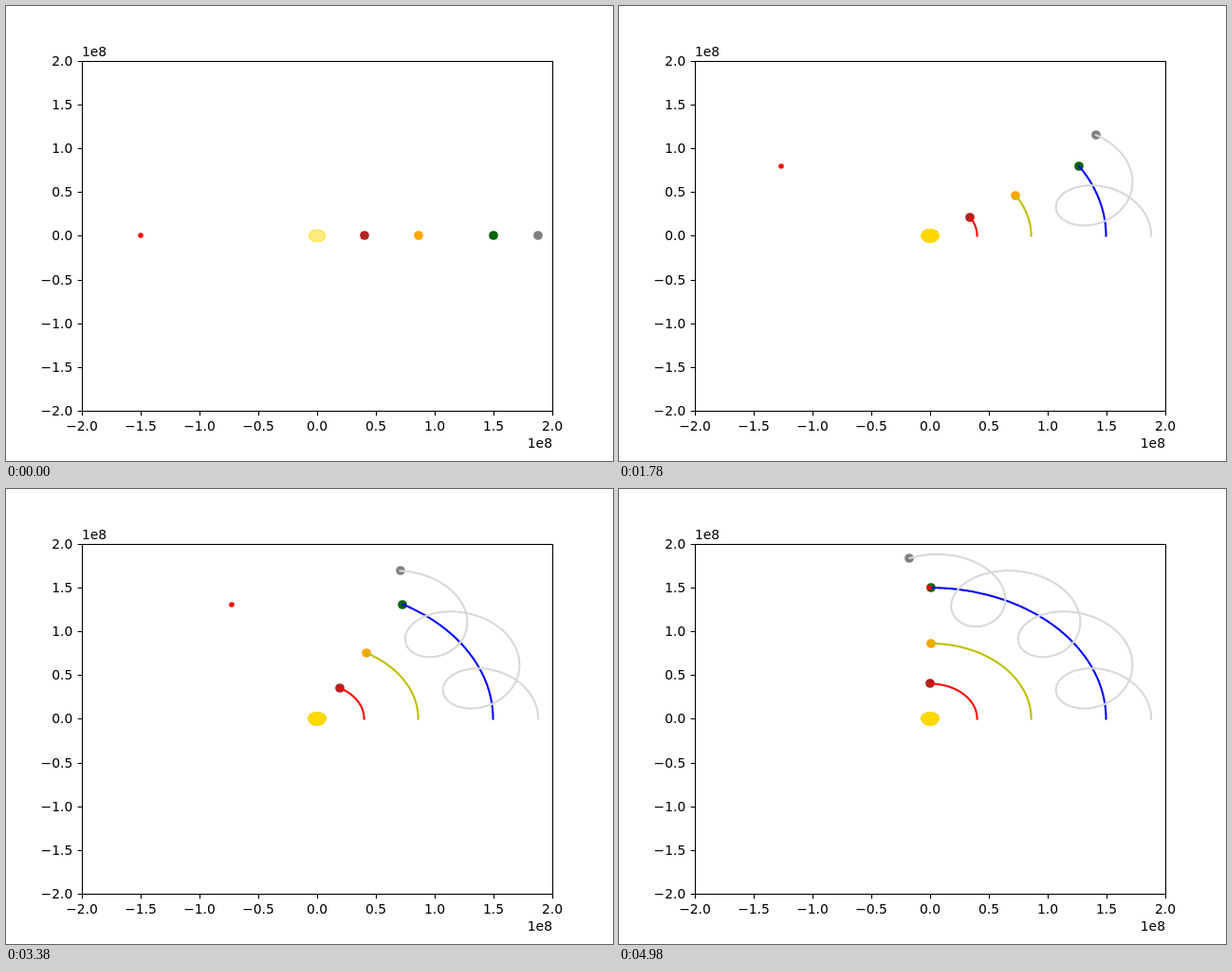
An HTML page that plays this animation: 640 by 480 pixels, repeating every 5000 ms.

```html
<!DOCTYPE html>
<html lang="en">
<head>
<meta charset="utf-8">
<title>Orbits</title>
<style>
  html, body { margin: 0; width: 100%; height: 100%; overflow: hidden; background: #fff; }
  svg { display: block; width: 640px; height: 480px; }
  text { font: 13.89px "DejaVu Sans", sans-serif; fill: #000; }
  .axis { stroke: #000; stroke-width: 1.11; fill: none; }
  .trail { fill: none; stroke-width: 2.08; stroke-linecap: square; stroke-linejoin: round; }
  .sun { fill: gold; fill-opacity: .5; stroke: gold; stroke-opacity: .5; stroke-width: 1.39; }
</style>
</head>
<body>
<svg id="stage" viewBox="0 0 640 480"></svg>
<script>
const STEPS = 250, STEP_MS = 20;
const MOON_RATE = 13.37; // moon turns per planet turn
const stage = document.getElementById('stage');

const px = x => 328 + 124 * x;      // data unit: 1e8
const py = y => 242.4 - 92.4 * y;
const snap = v => Math.floor(v + 0.5) + 0.5;
const angle = k => k / STEPS * Math.PI / 2;

function add(tag, attrs, text) {
  const el = document.createElementNS('http://www.w3.org/2000/svg', tag);
  for (const name in attrs) el.setAttribute(name, attrs[name]);
  if (text) el.textContent = text;
  return stage.appendChild(el);
}

const orbit = (r, phase = 0, dir = 1) => k => {
  const a = angle(k);
  return [dir * r * Math.cos(a), r * Math.sin(a)];
};
const earth = k => [1.496 * Math.cos(angle(k)), 1.496 * Math.sin(angle(k))];
const circle = r => k => [r * Math.cos(angle(k)), r * Math.sin(angle(k))];
const moon = k => {
  const [x, y] = earth(k), a = MOON_RATE * angle(k);
  return [x + 0.384 * Math.cos(a), y + 0.384 * Math.sin(a)];
};
const mirror = k => {
  const [x, y] = earth(k);
  return [-x, y];
};

const bodies = [
  { at: circle(0.4), color: 'firebrick', size: 4.86, trail: '#f00' },
  { at: circle(0.86), color: 'orange', size: 4.86, trail: '#bfbf00' },
  { at: earth, color: 'darkgreen', size: 4.86, trail: '#00f' },
  { at: moon, color: 'gray', size: 4.86, trail: '#d8d8d8' },
  { at: mirror, color: 'red', size: 2.78 }
];

// The translucent sun is painted once more on every step, so it builds up.
const suns = Array.from({ length: STEPS }, () =>
  add('ellipse', { class: 'sun', cx: px(0), cy: py(0), rx: 8.68, ry: 6.47 }));

for (const body of bodies) body.dot = add('circle', { r: body.size, fill: body.color });
for (const body of bodies) {
  if (!body.trail) continue;
  body.line = add('polyline', { class: 'trail', stroke: body.trail });
  body.points = Array.from({ length: STEPS }, (_, k) => {
    const [x, y] = body.at(k);
    return px(x).toFixed(2) + ',' + py(y).toFixed(2);
  });
}
stage.append(bodies[4].dot);

function drawAxes() {
  const left = snap(px(-2)), right = snap(px(2)), top = snap(py(2)), bottom = snap(py(-2));
  add('rect', { class: 'axis', x: left, y: top, width: right - left, height: bottom - top });
  for (let v = -2; v <= 2; v += 0.5) {
    const label = v.toFixed(1).replace('-', '\u2212');
    const x = snap(px(v)), y = snap(py(v));
    add('path', { class: 'axis', d: `M${x} ${bottom}v4.86M${left} ${y}h-4.86` });
    add('text', { x: px(v), y: 448, 'text-anchor': 'middle' }, label);
    add('text', { x: 70.3, y: Math.round(py(v) + 5), 'text-anchor': 'end' }, label);
  }
  add('text', { x: 80, y: 53 }, '1e8');
  add('text', { x: 576, y: 466, 'text-anchor': 'end' }, '1e8');
}

function render(ms) {
  const k = Math.floor(ms / STEP_MS + 0.001) % STEPS;
  suns.forEach((sun, i) => sun.setAttribute('display', i <= k ? 'inline' : 'none'));
  for (const { at, dot, line, points } of bodies) {
    const [x, y] = at(k);
    dot.setAttribute('cx', Math.round(px(x)));
    dot.setAttribute('cy', Math.round(py(y)));
    if (line) line.setAttribute('points', k ? points.slice(0, k + 1).join(' ') : '');
  }
}

drawAxes();
render(0);
const start = performance.now();
(function tick() {
  render(Math.max(0, performance.now() - start));
  requestAnimationFrame(tick);
})();
</script>
</body>
</html>
```
